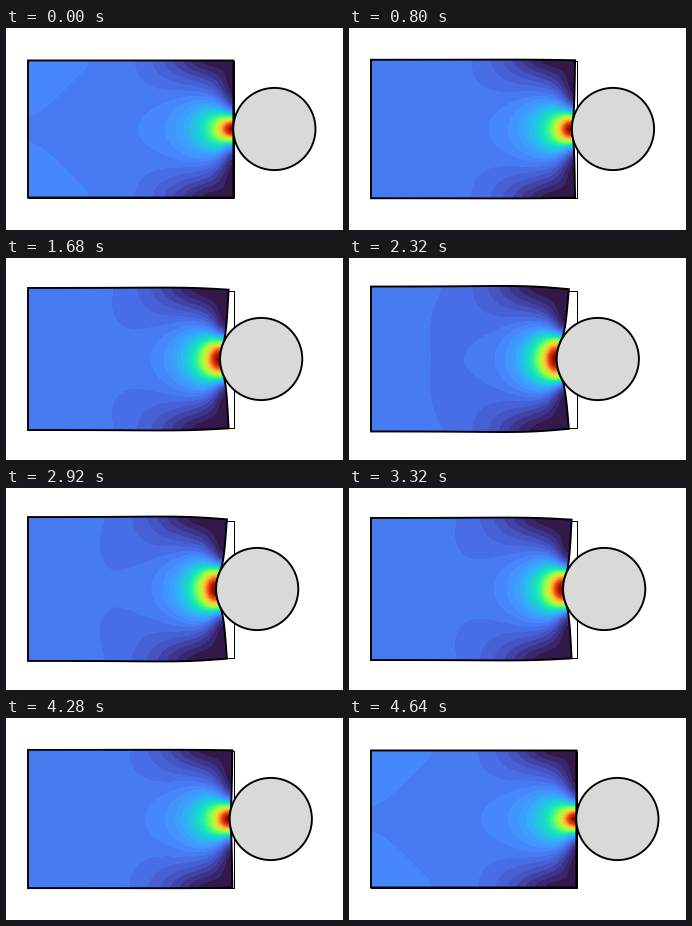
A matplotlib script that plays this animation: 337 by 202 pixels, repeating every 4680 ms.

```python
"""A rigid disc is pushed into a soft block; colour shows the pressure."""
import numpy as np
import matplotlib.pyplot as plt
from matplotlib.animation import FuncAnimation
from matplotlib.patches import Circle, Polygon, Rectangle

# Stage, in pixels
WIDTH, HEIGHT, DPI = 337, 202, 100
LEFT, MID, SCALE = 22, 101, 137
PX = 72 / DPI

# Motion
HOLD, STEPS = 10, 49
FIRST_DEPTH, STEP_DEPTH = 0.0015, 0.00292

# Block of 1.5 x 1 (upper half is solved) and the disc
LENGTH, RADIUS = 1.5, 0.3
NX, NY = 60, 20
SHEAR, LAME = 1.0, 40.0

SIGNS = np.array([(-1, -1), (1, -1), (1, 1), (-1, 1)])


def strain_matrix(xi, eta, size):
    """Strain-displacement matrix of a square four-node element."""
    sx, sy = SIGNS.T
    dx = sx * (1 + sy * eta) / (2 * size)
    dy = sy * (1 + sx * xi) / (2 * size)
    b = np.zeros((3, 8))
    b[0, ::2] = b[2, 1::2] = dx
    b[1, 1::2] = b[2, ::2] = dy
    return b


def build_block():
    """Return the response to unit pushes on the right face, and element dofs."""
    size = LENGTH / NX
    node = np.arange((NX + 1) * (NY + 1)).reshape(NX + 1, NY + 1)
    corners = np.stack([node[:-1, :-1], node[1:, :-1],
                        node[1:, 1:], node[:-1, 1:]], axis=-1).reshape(-1, 4)
    dofs = np.stack([2 * corners, 2 * corners + 1], axis=-1).reshape(-1, 8)

    # Reduced integration of the volume term avoids locking
    area = size ** 2
    div = strain_matrix(0, 0, size)[:2].sum(axis=0)
    ke = LAME * area * np.outer(div, div)
    shear = SHEAR * np.diag([2, 2, 1])
    for xi, eta in SIGNS / np.sqrt(3):
        b = strain_matrix(xi, eta, size)
        ke += b.T @ shear @ b * area / 4

    total = 2 * node.size
    stiff = np.zeros((total, total))
    np.add.at(stiff, (dofs[:, :, None], dofs[:, None, :]), ke)

    fixed = np.concatenate([2 * node[0], 2 * node[:, 0] + 1])
    free = np.setdiff1d(np.arange(total), fixed)
    face = 2 * node[-1]
    loads = np.zeros((total, NY + 1))
    loads[face, np.arange(NY + 1)] = -1
    response = np.zeros_like(loads)
    response[free] = np.linalg.solve(stiff[np.ix_(free, free)], loads[free])
    return response, face, dofs, div


RESPONSE, FACE, DOFS, DIV = build_block()
COMPLIANCE = -RESPONSE[FACE]
GRID_X, GRID_Y = np.meshgrid(np.linspace(0, LENGTH, NX + 1),
                             np.linspace(0, 0.5, NY + 1), indexing="ij")


def press(depth):
    """Displacements for a frictionless contact at the given depth."""
    y = GRID_Y[-1]
    active = np.arange(NY + 1) == 0
    for _ in range(40):
        push = depth - RADIUS + np.sqrt(np.maximum(RADIUS ** 2 - y ** 2, 0))
        force = np.zeros(NY + 1)
        force[active] = np.linalg.solve(COMPLIANCE[np.ix_(active, active)],
                                        push[active])
        force = np.maximum(force, 0)
        overlap = push - COMPLIANCE @ force
        active = (force > 0) | (~active & (overlap > 1e-9))
        active[0] = True
        y = GRID_Y[-1] + RESPONSE[FACE + 1] @ force
    return RESPONSE @ force


def smooth(a):
    a = np.pad(a, 1, mode="reflect")
    a = (a[:-2] + 2 * a[1:-1] + a[2:]) / 4
    return (a[:, :-2] + 2 * a[:, 1:-1] + a[:, 2:]) / 4


def pressure(u):
    p = -(u[DOFS] @ DIV).reshape(NX, NY)
    p = np.pad(p, 1, mode="edge")
    p = (p[:-1, :-1] + p[1:, :-1] + p[:-1, 1:] + p[1:, 1:]) / 4
    for _ in range(6):
        p = smooth(p)
    return p


def shade(p, base):
    """Scale to 0..1 with the far end of the block at the base tone."""
    t = np.clip((p - p.min()) / np.ptp(p), 0, 1)
    ref = np.clip(t[0, 4], 0.02, 0.9)
    return t ** (np.log(base) / np.log(ref))


def mirror(a, sign=1):
    return np.hstack([sign * a[:, :0:-1], a])


def solve_state(step):
    depth = FIRST_DEPTH + STEP_DEPTH * step
    u = press(depth)
    x = GRID_X + u[::2].reshape(GRID_X.shape)
    y = GRID_Y + u[1::2].reshape(GRID_Y.shape)
    tone = shade(pressure(u), 0.16 - 0.017 * step / STEPS)
    return (LEFT + SCALE * mirror(x), MID + SCALE * mirror(y, -1),
            mirror(tone), LEFT + SCALE * (LENGTH - depth + RADIUS))


states = [solve_state(step) for step in range(STEPS + 1)]

fig = plt.figure(figsize=(WIDTH / DPI, HEIGHT / DPI), dpi=DPI, facecolor="white")
ax = fig.add_axes([0, 0, 1, 1])
ax.set_xlim(0, WIDTH)
ax.set_ylim(HEIGHT, 0)
ax.set_axis_off()

ax.add_patch(Rectangle((LEFT, MID - SCALE / 2), LENGTH * SCALE, SCALE,
                       fill=False, ec="black", lw=1 * PX, zorder=1))
outline = ax.add_patch(Polygon([(0, 0), (1, 0), (1, 1)], fill=False, ec="black",
                               lw=1.9 * PX, joinstyle="miter", zorder=3))
disc = ax.add_patch(Circle((0, MID), RADIUS * SCALE, fc="#d9d9d9", ec="black",
                           lw=1.9 * PX, zorder=4))
levels = np.linspace(0, 1, 51)
field = None


def border(a):
    return np.concatenate([a[:, 0], a[-1, 1:], a[-2::-1, -1]])


def draw(frame):
    global field
    step = (np.clip(frame - HOLD + 1, 0, STEPS)
            - np.clip(frame - 2 * HOLD - STEPS + 2, 0, STEPS))
    x, y, tone, centre = states[step]
    if field is not None:
        field.remove()
    field = ax.contourf(x, y, tone, levels=levels, cmap="turbo",
                        vmin=0, vmax=1, zorder=2)
    outline.set_xy(np.column_stack([border(x), border(y)]))
    disc.center = centre, MID
    return field, outline, disc


anim = FuncAnimation(fig, draw, frames=2 * STEPS + 2 * HOLD - 1, interval=40,
                     repeat=True, repeat_delay=0, blit=False)
plt.show()
```
